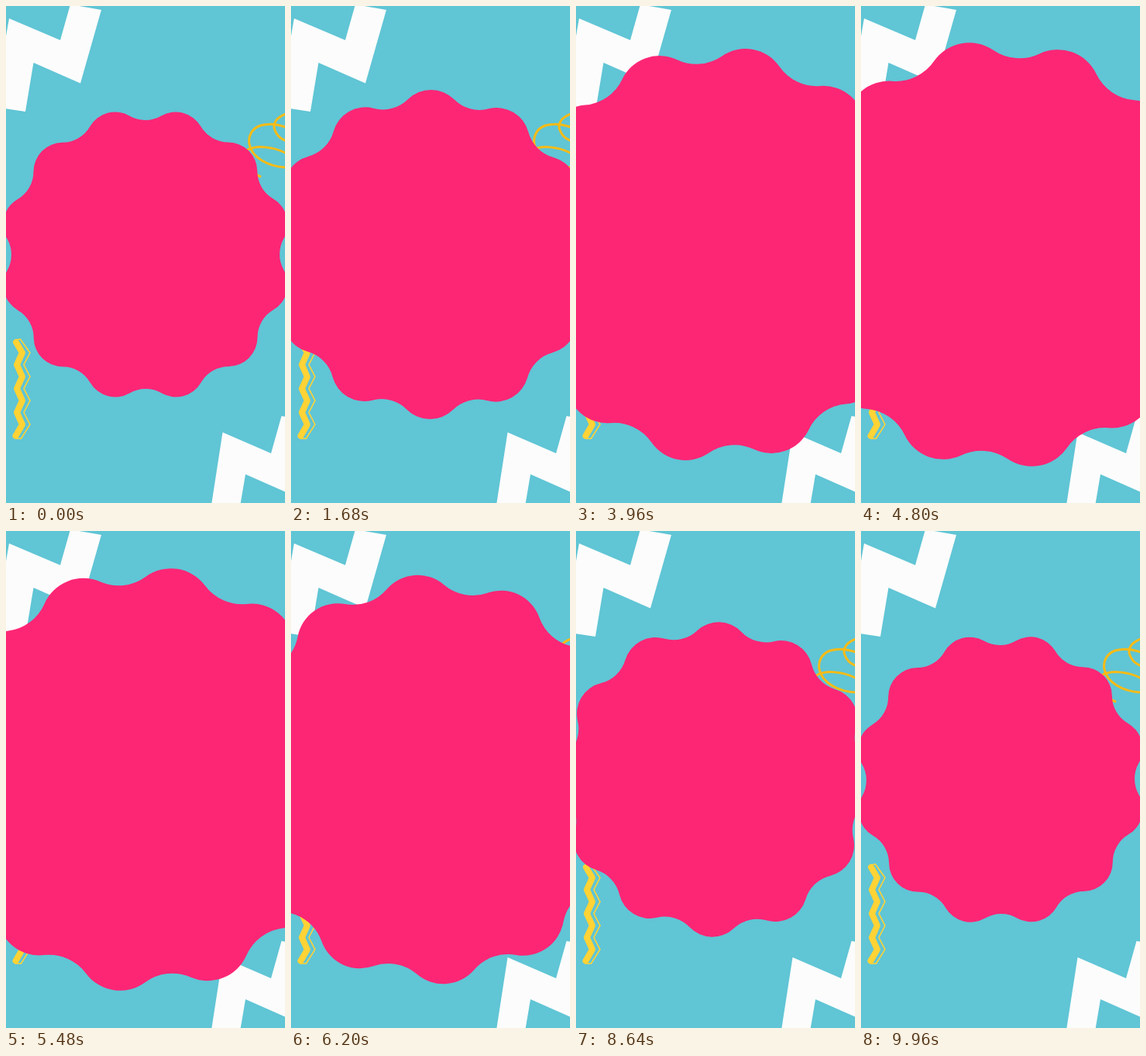
These frames come from a looping animation (360x640 px, 10000 ms). An HTML page:

```html
<!DOCTYPE html>
<html lang="en">
<head>
<meta charset="utf-8">
<title>Rolling scalloped badge</title>
<style>
  html, body { margin: 0; width: 100%; height: 100%; overflow: hidden; background: #60c5d5; }
  svg { display: block; width: 100vw; height: 100vh; }
</style>
</head>
<body>
<svg viewBox="0 0 360 640" preserveAspectRatio="none">
  <rect width="360" height="640" fill="#60c5d5"/>
  <g fill="#fcfcfc">
    <path d="M4 16L70 44L83 -2L123 5L96 99.500L35.500 73L25 136L-16 130Z"/>
    <path d="M279.500 549L342 576L355.500 528L396 535L370 630L309 603L299 662L262 662Z"/>
  </g>
  <g fill="none" stroke="#f8bb16" stroke-width="3" stroke-linecap="round">
    <path d="M364 138C350 142 343 151 347 160C350 168 356 173 366 175"/>
    <path d="M366 158C352 152 338 151 328 154C317 158 312 168 314 178C317 194 337 208 366 208"/>
    <path d="M310 186C322 179 345 180 366 192"/>
    <path d="M322 217L328 219.500"/>
  </g>
  <g fill="none" stroke="#ffd335" stroke-linejoin="round" stroke-linecap="round">
    <path id="thick" stroke-width="8"/>
    <path id="thin" stroke-width="1.600"/>
  </g>
  <path id="badge" fill="#fd2675"/>
</svg>
<script>
const LOOP = 10000;
const LOBES = 12;
const byId = id => document.getElementById(id);

function zigzag(left, right, top, bottom) {
  const pts = [];
  for (let i = 0; i < 7; i++) {
    pts.push(`${i % 2 ? left : right} ${446.5 + i * 15.4}`);
  }
  return `M${top}L${pts.join('L')}L${bottom}`;
}

// Convex lobes joined by tangent concave arcs, centred on the origin
function scallop() {
  const step = 360 / LOBES, r = 179.7, edge = 6.54;
  const at = deg => {
    const a = deg * Math.PI / 180;
    return `${(r * Math.sin(a)).toFixed(2)} ${(-r * Math.cos(a)).toFixed(2)}`;
  };
  let d = `M${at(edge)}`;
  for (let k = 0; k < LOBES; k++) {
    d += `A37.6 37.6 0 0 1 ${at((k + 1) * step - edge)}`;
    d += `A41 41 0 0 0 ${at((k + 1) * step + edge)}`;
  }
  return d + 'Z';
}

byId('thick').setAttribute('d', zigzag(14, 21, '13 433', '12.5 553.5'));
byId('thin').setAttribute('d', zigzag(23, 31, '13 430L18.5 429', '19.5 557L13 557'));
const badge = byId('badge');
badge.setAttribute('d', scallop());

function draw(ms) {
  const s = ms / 1000;
  const scale = 1 + 0.467 * (1 - Math.cos(2 * Math.PI * (ms + 45) / LOOP)) / 2;
  const turn = -(62.75 * s - 0.25 * s * s);
  badge.setAttribute('transform', `translate(180 320) rotate(${turn}) scale(${scale})`);
}

const start = performance.now();
function tick() {
  draw((performance.now() - start) % LOOP);
  requestAnimationFrame(tick);
}
draw(0);
requestAnimationFrame(tick);
</script>
</body>
</html>
```
